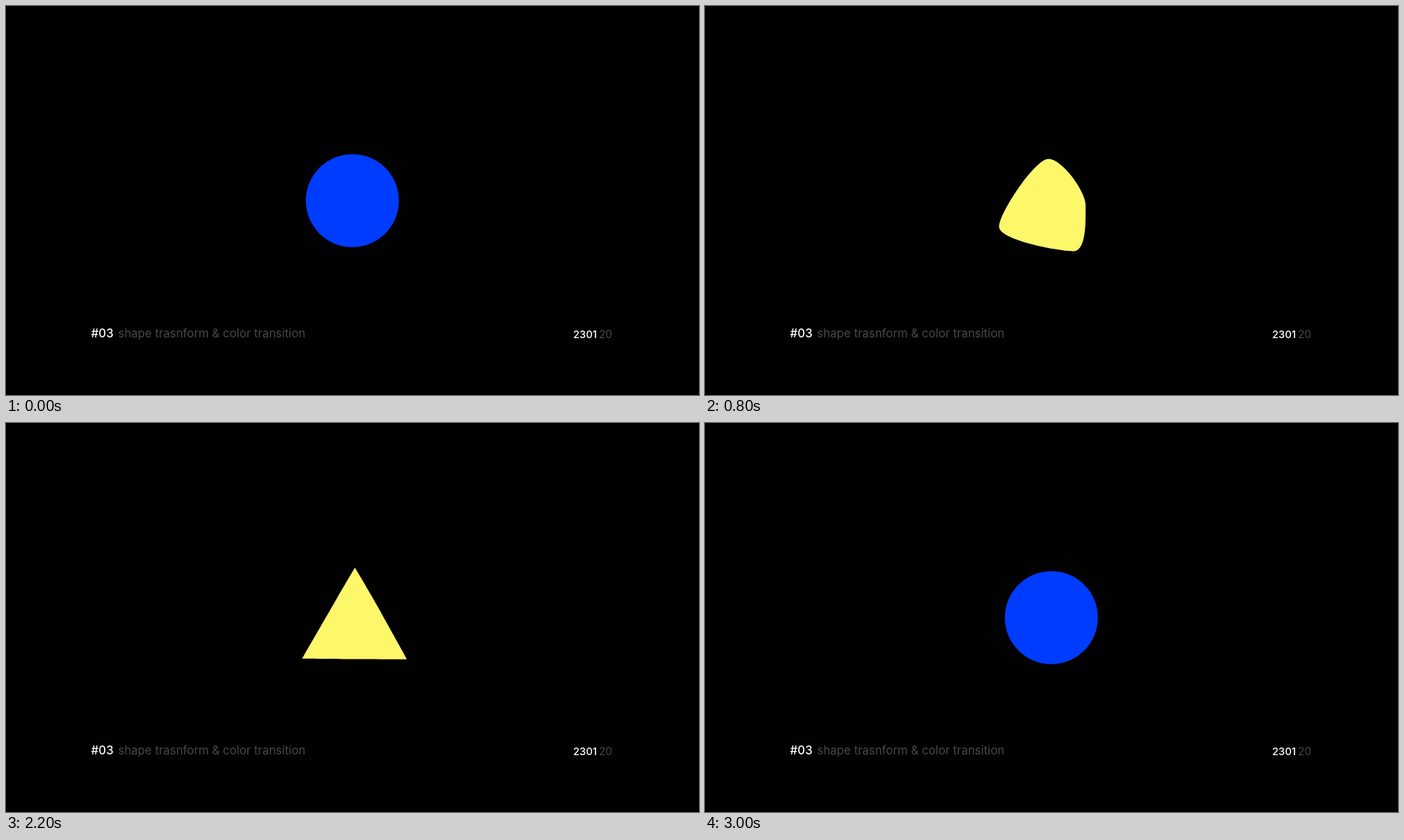
These frames come from a looping animation (998 px wide and 561 px high, 4000 ms). An HTML page:

```html
<!DOCTYPE html>
<html lang="en">
<head>
<meta charset="utf-8">
<title>Shape transform and color transition</title>
<style>
  html, body { margin: 0; width: 100%; height: 100%; overflow: hidden; background: #010101; }
  svg { display: block; width: 100%; height: 100%; }
  text { font: 16.85px Inter, sans-serif; fill: #484848; }
  .date { font-size: 15.4px; text-anchor: end; }
  .strong { font-weight: 500; fill: #fff; }
  .date.strong { font-size: 14.9px; }
</style>
</head>
<body>
<svg viewBox="0 0 998 561">
  <path id="shape"/>
  <text class="strong" x="122.5" y="478">#03</text>
  <text x="161.5" y="478">shape trasnform &amp; color transition</text>
  <text class="date strong" x="851" y="479">2301</text>
  <text class="date" x="873" y="479">20</text>
</svg>
<script>
const shape = document.getElementById('shape');
const BLUE = [0, 60, 255], WHITE = [255, 255, 255], YELLOW = [252, 242, 13];
const HANDLE = 67 * 0.5523;

// Matching vertices: top, right, bottom, left of the circle
const CIRCLE = [[498.8, 213.7], [565.8, 280.7], [498.8, 347.7], [431.8, 280.7]];
const TRIANGLE = [[498.8, 214.6], [536.8, 280.6], [574.8, 346.6], [422.8, 346.6]];
const TANGENTS = [[1, 0], [0, 1], [-1, 0], [0, -1]];

const lerp = (a, b, t) => a + (b - a) * t;
const mix = (a, b, t) => a.map((v, i) => lerp(v, b[i], t));
const smooth = t => t * t * (3 - 2 * t);

// cubic-bezier(1, 0, .833, 1)
function morphEase(x) {
  let lo = 0, hi = 1;
  for (let i = 0; i < 30; i++) {
    const s = (lo + hi) / 2, r = 1 - s;
    if (3 * r * r * s + 2.5 * r * s * s + s * s * s < x) lo = s; else hi = s;
  }
  return smooth(lo);
}

// Drift away with an ease-out, then glide back
function drift(t) {
  if (t < 0.64) return 1 - (1 - t / 0.64) ** 1.6;
  return 1 - smooth(Math.min((t - 0.64) / 0.32, 1));
}

function shapePath(roundness, dx, dy) {
  const points = CIRCLE.map((p, i) => mix(TRIANGLE[i], p, roundness));
  const k = HANDLE * roundness;
  const at = (i, side) => points[i].map((v, j) => v + TANGENTS[i][j] * k * side + (j ? dy : dx)).join(' ');
  let d = 'M' + at(0, 0);
  for (let i = 0; i < 4; i++) {
    const next = (i + 1) % 4;
    d += `C${at(i, 1)} ${at(next, -1)} ${at(next, 0)}`;
  }
  return d + 'Z';
}

function draw(now) {
  const time = Math.floor(now / 40) * 40 % 4000;
  const back = time >= 2000;
  const t = Math.min(time % 2000 / 1000, 1);
  const p = morphEase(t);
  const away = drift(t) * (back ? -1 : 1);
  shape.setAttribute('d', shapePath(back ? p : 1 - p, -8.1 * away, 12.9 * away));

  const c = back ? 1 - t : t;
  const color = c < 0.48 ? mix(BLUE, WHITE, c / 0.48) : mix(WHITE, YELLOW, (c - 0.48) / 0.52);
  shape.setAttribute('fill', `rgb(${color.map(Math.round)})`);
}

const start = performance.now();
function tick() {
  draw(performance.now() - start);
  requestAnimationFrame(tick);
}
tick();
</script>
</body>
</html>
```
